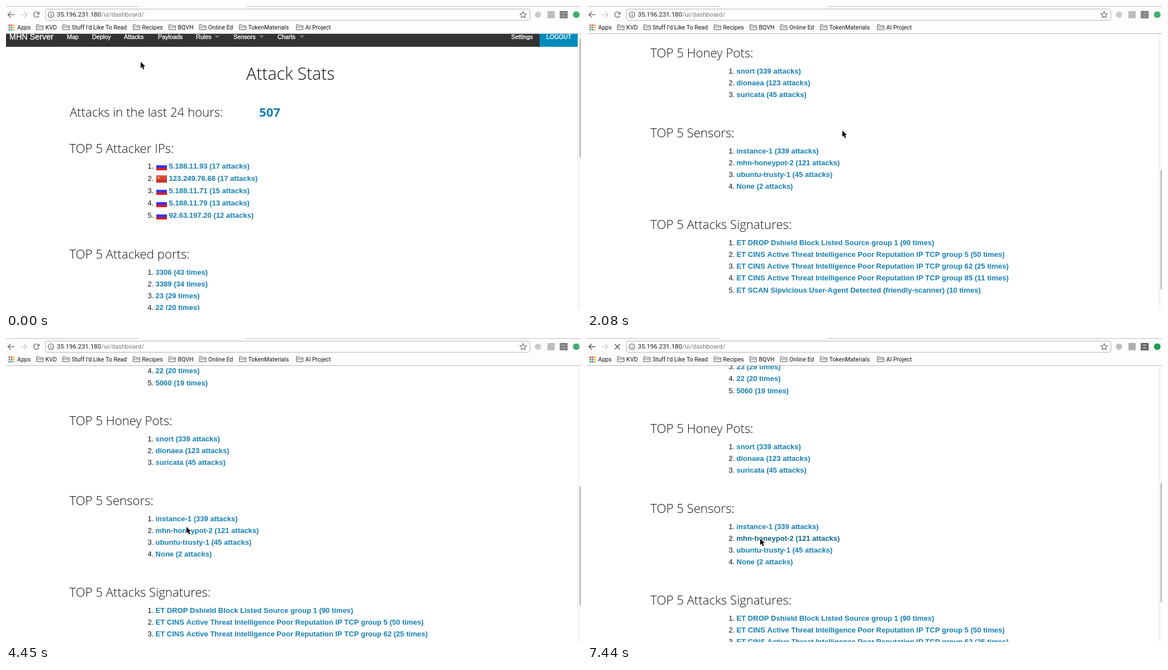
An HTML page with a canvas for the animation above (8 s loop, 1029 px wide and 544 px high).

```html
<!DOCTYPE html>
<html lang="en">
<head>
<meta charset="utf-8">
<title>Attack Stats</title>
<style>
html, body { margin: 0; width: 100%; height: 100%; overflow: hidden; background: #fff; }
canvas { display: block; width: 1029px; height: 544px; }
</style>
</head>
<body>
<canvas id="stage" width="1029" height="544"></canvas>
<script>
const ctx = document.getElementById('stage').getContext('2d');
const W = 1029, H = 544, LOOP = 8000, STEP = 148.1, LEAD = 20, TOP = 50;
const LINK = '#1580b3', HOVER = '#0d6689', INK = '#151515';
const SANS = '"Liberation Sans", Arial, sans-serif';
const OPEN = '"Open Sans", sans-serif';
const UI = 'Roboto, sans-serif';

// [step, scroll offset] and [step, x, y]
const SCROLL = [[0, 0], [1, 90], [2, 330], [3, 510], [4, 565], [8, 565], [14, 545], [16, 538],
  [23, 538], [24, 526], [27, 498], [30, 481], [31, 481], [34, 467]];
const POINTER = [[0, 241, 100], [4, 241, 103], [8, 457, 223], [16, 457, 223], [23, 323, 338],
  [31, 323, 338], [34, 313, 339], [36, 309, 339], [37, 309, 339], [38, 309, 354],
  [46, 309, 354], [47, 310, 359]];
const FOCUS = 43, OVER = 47, LOADING = 50;

const SECTIONS = [
  { title: 'TOP 5 Attacker IPs:', y: 263, first: 291, gap: 22, flags: 'rcrrr', items: [
    '5.188.11.93 (17 attacks)', '123.249.76.68 (17 attacks)', '5.188.11.71 (15 attacks)',
    '5.188.11.79 (13 attacks)', '92.63.197.20 (12 attacks)'] },
  { title: 'TOP 5 Attacked ports:', y: 452, items: [
    '3306 (43 times)', '3389 (34 times)', '23 (29 times)', '22 (20 times)', '5060 (19 times)'] },
  { title: 'TOP 5 Honey Pots:', y: 637, items: [
    'snort (339 attacks)', 'dionaea (123 attacks)', 'suricata (45 attacks)'] },
  { title: 'TOP 5 Sensors:', y: 780, items: [
    'instance-1 (339 attacks)', 'mhn-honeypot-2 (121 attacks)',
    'ubuntu-trusty-1 (45 attacks)', 'None (2 attacks)'] },
  { title: 'TOP 5 Attacks Signatures:', y: 944, items: [
    'ET DROP Dshield Block Listed Source group 1 (90 times)',
    'ET CINS Active Threat Intelligence Poor Reputation IP TCP group 5 (50 times)',
    'ET CINS Active Threat Intelligence Poor Reputation IP TCP group 62 (25 times)',
    'ET CINS Active Threat Intelligence Poor Reputation IP TCP group 85 (11 times)',
    'ET SCAN Sipvicious User-Agent Detected (friendly-scanner) (10 times)'] }
];
const NAV = [['Map', 109], ['Deploy', 154], ['Attacks', 211], ['Payloads', 272],
  ['Rules', 340, 378], ['Sensors', 407, 457.5], ['Charts', 486, 529.5], ['Settings', 904]];
const BOOKMARKS = [['KVD', 54], ["Stuff I'd Like To Read", 101], ['Recipes', 227], ['BQVH', 291],
  ['Online Ed', 345.5], ['TokenMaterials', 417], ['AI Project', 519]];
const APP_COLORS = ['#e8473c', '#e8473c', '#f5b92e', '#3fa65a', '#4a86e8', '#f5b92e',
  '#3fa65a', '#4a86e8', '#f5b92e'];

function at(keys, s) {
  let i = keys.length - 1;
  while (i > 0 && keys[i][0] > s) i--;
  const a = keys[i], b = keys[i + 1];
  if (!b) return a.slice(1);
  const p = (s - a[0]) / (b[0] - a[0]);
  return a.slice(1).map((v, k) => v + (b[k + 1] - v) * p);
}

function rect(x, y, w, h, color) {
  ctx.fillStyle = color;
  ctx.fillRect(x, y, w, h);
}

function text(str, x, y, font, color, kern = 'auto') {
  ctx.font = font;
  ctx.fontKerning = kern;
  ctx.fillStyle = color;
  ctx.fillText(str, x, y);
}

function path(points, close) {
  ctx.beginPath();
  points.forEach(([x, y]) => ctx.lineTo(x, y));
  if (close) ctx.closePath();
}

function line(points, color, width = 1) {
  path(points);
  ctx.strokeStyle = color;
  ctx.lineWidth = width;
  ctx.stroke();
}

function disc(x, y, r, color) {
  ctx.beginPath();
  ctx.arc(x, y, r, 0, 7);
  ctx.fillStyle = color;
  ctx.fill();
}

function box(x, y, w, h, r, fill, stroke) {
  ctx.beginPath();
  ctx.roundRect(x, y, w, h, r);
  ctx.fillStyle = fill;
  ctx.fill();
  if (!stroke) return;
  ctx.strokeStyle = stroke;
  ctx.lineWidth = 1;
  ctx.stroke();
}

function star(x, y, r) {
  path(Array.from({ length: 10 }, (_, i) => {
    const a = i * Math.PI / 5 - Math.PI / 2, d = i % 2 ? r * 0.45 : r;
    return [x + d * Math.cos(a), y + d * Math.sin(a)];
  }), true);
}

function flag(kind, y) {
  const x = 269;
  if (kind === 'r') {
    rect(x, y - 9, 19, 4, '#f4f4f4');
    rect(x, y - 6, 19, 5, '#3a33e6');
    rect(x, y - 1, 19, 4, '#e01a1f');
    return;
  }
  const g = ctx.createLinearGradient(0, y - 10, 0, y + 3);
  g.addColorStop(0, '#dd5a4a');
  g.addColorStop(1, '#c62a20');
  rect(x, y - 10, 19, 13, g);
  star(x + 4, y - 6, 2.5);
  ctx.fillStyle = '#f6c944';
  ctx.fill();
}

function drawNav() {
  rect(0, 28, 1023, 45, '#333');
  rect(955, 28, 68, 45, '#008cba');
  const label = (str, x, y, size) => {
    text(str, x, y, size + 'px ' + SANS, '#fff');
    ctx.strokeStyle = '#fff';
    ctx.lineWidth = 0.35;
    ctx.strokeText(str, x, y);
  };
  label('MHN Server', 6, 60, 14.3);
  for (const [str, x, arrow] of NAV) {
    label(str, x, 59, 10.8);
    if (!arrow) continue;
    path([[arrow - 4, 53], [arrow + 4, 53], [arrow, 57]], true);
    ctx.fillStyle = '#858585';
    ctx.fill();
  }
  label('LOGOUT', 967, 59, 10.6);
}

function drawPage(scroll, s) {
  ctx.save();
  ctx.beginPath();
  ctx.rect(0, TOP, W, H - TOP);
  ctx.clip();
  ctx.translate(0, -scroll);
  drawNav();
  const heading = '300 22.2px ' + OPEN;
  text('Attack Stats', 430, 132, '300 30.3px ' + OPEN, INK);
  text('Attacks in the last 24 hours:', 114, 198, heading, INK);
  text('507', 453, 198, 'bold 22.2px ' + OPEN, LINK);
  for (const { title, y, first = y + 29, gap = 21.15, flags, items } of SECTIONS) {
    text(title, 113.5, y, heading, INK);
    items.forEach((item, i) => {
      const base = Math.round(first + gap * i);
      const over = s >= OVER && item.startsWith('mhn');
      text(i + 1 + '.', 253.5, base, '13px ' + SANS, INK);
      if (flags) flag(flags[i], base);
      text(item, flags ? 291.5 : 267.5, base, 'bold 13.05px ' + SANS, over ? HOVER : LINK, 'none');
    });
  }
  ctx.restore();
  rect(1023, TOP, 6, H - TOP, '#fafafa');
  rect(1023, TOP, 1, H - TOP, '#e7e7e7');
  box(1026, 57 + scroll * 0.432, 8, 215, 4, '#c1c1c1');
}

function drawFolder(x) {
  path([[x + 0.5, 42.5], [x + 0.5, 33.5], [x + 5, 33.5], [x + 6.5, 35], [x + 12.5, 35], [x + 12.5, 42.5]], true);
  ctx.fillStyle = '#e4e4e4';
  ctx.fill();
  ctx.strokeStyle = '#6e6e6e';
  ctx.lineWidth = 1;
  ctx.stroke();
  line([[x + 1, 37.5], [x + 12, 37.5]], '#8b8b8b');
}

function drawArrow(x, dir, color) {
  line([[x - 5.5 * dir, 15.5], [x + 6 * dir, 15.5]], color, 1.5);
  line([[x - 0.5 * dir, 10.5], [x - 5.5 * dir, 15.5], [x - 0.5 * dir, 20.5]], color, 1.5);
}

function drawReload(color) {
  ctx.beginPath();
  ctx.arc(54.5, 15.5, 4.8, 0.4, 5.5);
  ctx.strokeStyle = color;
  ctx.lineWidth = 1.5;
  ctx.stroke();
  path([[60, 10], [60, 15], [55, 15]], true);
  ctx.fillStyle = color;
  ctx.fill();
}

function drawToolbar(s) {
  const active = s >= FOCUS;
  const icon = active ? '#555' : '#777';
  rect(0, 0, W, TOP, '#fdfdfd');
  rect(0, 0, 237, 1, '#b9b9b9');
  rect(430, 0, W - 430, 1, '#b9b9b9');
  rect(0, 49, W, 1, '#b8b8b8');

  drawArrow(9, 1, icon);
  drawArrow(32, -1, '#d0d0d0');
  if (s >= LOADING) {
    line([[50, 11], [59, 20]], icon, 1.6);
    line([[59, 11], [50, 20]], icon, 1.6);
  } else drawReload(icon);

  box(70.5, 5.5, 867, 20, 3, '#fff', '#b4b4b4');
  ctx.beginPath();
  ctx.arc(80.5, 15.5, 5, 0, 7);
  ctx.strokeStyle = '#555';
  ctx.lineWidth = 1.1;
  ctx.stroke();
  rect(80, 12.5, 1.2, 1.3, '#555');
  rect(80, 14.8, 1.2, 3.6, '#555');
  text('35.196.231.180', 91, 19, '11.35px ' + UI, '#1a1a1a');
  text('/ui/dashboard/', 170.5, 19, '11.3px ' + UI, '#777');
  star(925.5, 16, 6);
  ctx.strokeStyle = '#666';
  ctx.lineWidth = 1.1;
  ctx.stroke();

  disc(952, 15.5, 5.5, active ? '#bdbdbd' : '#cbcbcb');
  rect(969, 9, 13, 13, active ? '#b0b0b0' : '#bdbdbd');
  rect(991, 9, 14, 13, active ? '#3c3c3c' : '#666');
  rect(994.5, 10.5, 7, 4.5, '#999');
  rect(994.5, 16, 7, 4.5, '#999');
  for (let y = 10; y < 21; y += 3) {
    rect(992, y, 1.5, 1.5, '#ddd');
    rect(1002.5, y, 1.5, 1.5, '#ddd');
  }
  disc(1020.5, 15.5, 6, active ? '#1f9d55' : '#43ad70');

  ctx.globalAlpha = active ? 1 : 0.88;
  APP_COLORS.forEach((c, i) => rect(4.5 + i % 3 * 4, 33 + Math.floor(i / 3) * 4, 3, 3, c));
  ctx.globalAlpha = 1;
  const font = '10.6px ' + UI;
  text('Apps', 20, 42, font, INK);
  for (const [name, x] of BOOKMARKS) {
    drawFolder(x);
    text(name, x + 16.5, 42, font, INK);
  }
}

function drawPointer(x, y) {
  ctx.save();
  ctx.translate(x, y);
  path([[0, 0], [0, 11.2], [2.6, 8.8], [4.5, 13.4], [6.5, 12.5], [4.6, 8.1], [8, 8]], true);
  ctx.lineJoin = 'round';
  ctx.strokeStyle = '#fff';
  ctx.lineWidth = 2;
  ctx.stroke();
  ctx.fillStyle = '#000';
  ctx.fill();
  ctx.restore();
}

function draw(now) {
  const s = Math.floor((now % LOOP + LEAD) / STEP);
  rect(0, 0, W, H, '#fff');
  drawPage(Math.round(at(SCROLL, s)[0]), s);
  drawToolbar(s);
  drawPointer(...at(POINTER, s));
}

let start;
function tick(now) {
  start ??= now;
  draw(now - start);
  requestAnimationFrame(tick);
}
requestAnimationFrame(tick);
</script>
</body>
</html>
```
